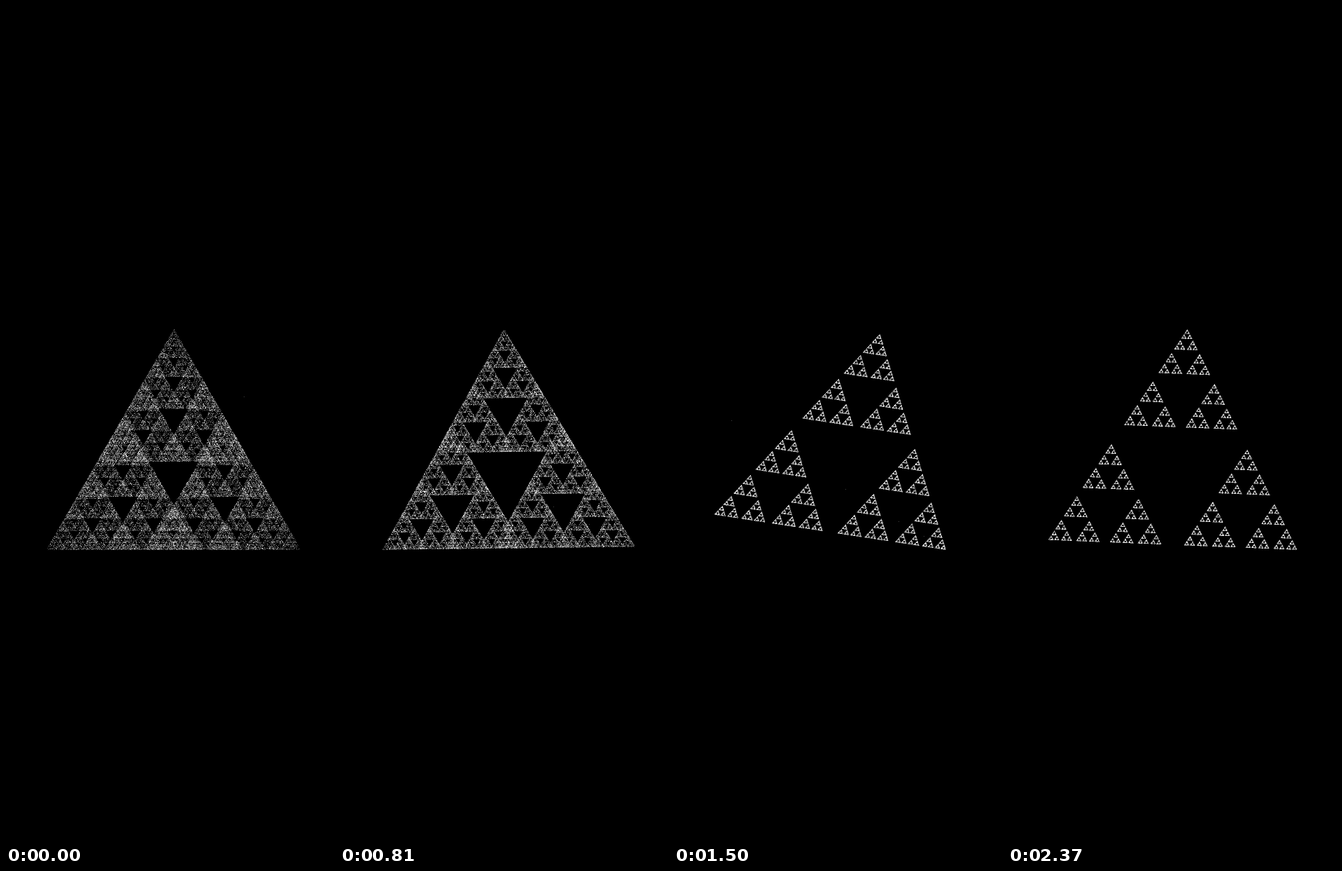
An HTML page with a canvas for the animation above (2400 ms loop, 469 by 1194 pixels).

```html
<!DOCTYPE html>
<html lang="en">
<head>
<meta charset="utf-8">
<title>Chaos game</title>
<style>
html, body { margin: 0; width: 100%; height: 100%; overflow: hidden; background: #000; }
canvas { display: block; }
</style>
</head>
<body>
<canvas width="469" height="1194"></canvas>
<script>
const W = 469, H = 1194;
const STEP = 30, STEPS = 80, POINTS = 50000;
const CX = 240, CY = 671, R = 210;
const BOX = { left: 58, right: 422, top: 412, bottom: 776 };
const FINE = 2; // dots are 1/FINE of a pixel wide

const ctx = document.querySelector('canvas').getContext('2d');
const image = ctx.createImageData(W, H);
const pixels = new Uint32Array(image.data.buffer);
const seen = new Uint8Array(W * H * FINE * FINE);
const clamp = (v, lo, hi) => Math.min(hi, Math.max(lo, v));

function random(seed) {
  return () => {
    seed = (seed + 0x6D2B79F5) | 0;
    let t = Math.imul(seed ^ (seed >>> 15), 1 | seed);
    t = (t + Math.imul(t ^ (t >>> 7), 61 | t)) ^ t;
    return ((t ^ (t >>> 14)) >>> 0) / 4294967296;
  };
}

// Corners turn on a circle but stay inside the box.
function corner(i, step) {
  const a = (i / 3 - step / STEPS) * 2 * Math.PI;
  return [
    clamp(CX + R * Math.sin(a), BOX.left, BOX.right - 0.5),
    clamp(CY - R * Math.cos(a), BOX.top, BOX.bottom - 0.5)
  ];
}

// Each fine cell lights its share of the pixel once.
function plot(x, y) {
  const cell = Math.floor(y * FINE) * W * FINE + Math.floor(x * FINE);
  if (seen[cell]) return;
  seen[cell] = 1;
  const i = Math.floor(y) * W + Math.floor(x);
  const level = Math.min(255, (pixels[i] & 255) + Math.ceil(255 / (FINE * FINE)));
  pixels[i] = 0xff000000 | level * 0x010101;
}

function draw(step) {
  const rnd = random(step + 1);
  const corners = [0, 1, 2].map(i => corner(i, step));
  // The ratio swings between 0.6 and 0.4 in a triangle wave of 30 steps.
  const ratio = 0.4 + Math.abs(step % 30 - 15) / 75;
  let x = BOX.left + rnd() * (BOX.right - BOX.left);
  let y = BOX.top + rnd() * (BOX.bottom - BOX.top);
  pixels.fill(0xff000000);
  seen.fill(0);
  for (let i = 0; i < POINTS; i++) {
    const [vx, vy] = corners[Math.floor(rnd() * 3)];
    x = vx + (x - vx) * ratio;
    y = vy + (y - vy) * ratio;
    plot(x, y);
  }
  ctx.putImageData(image, 0, 0);
}

const start = performance.now();
let shown = -1;
function tick() {
  const step = Math.floor(Math.max(0, performance.now() - start) / STEP) % STEPS;
  if (step !== shown) draw(shown = step);
  requestAnimationFrame(tick);
}
tick();
</script>
</body>
</html>
```
